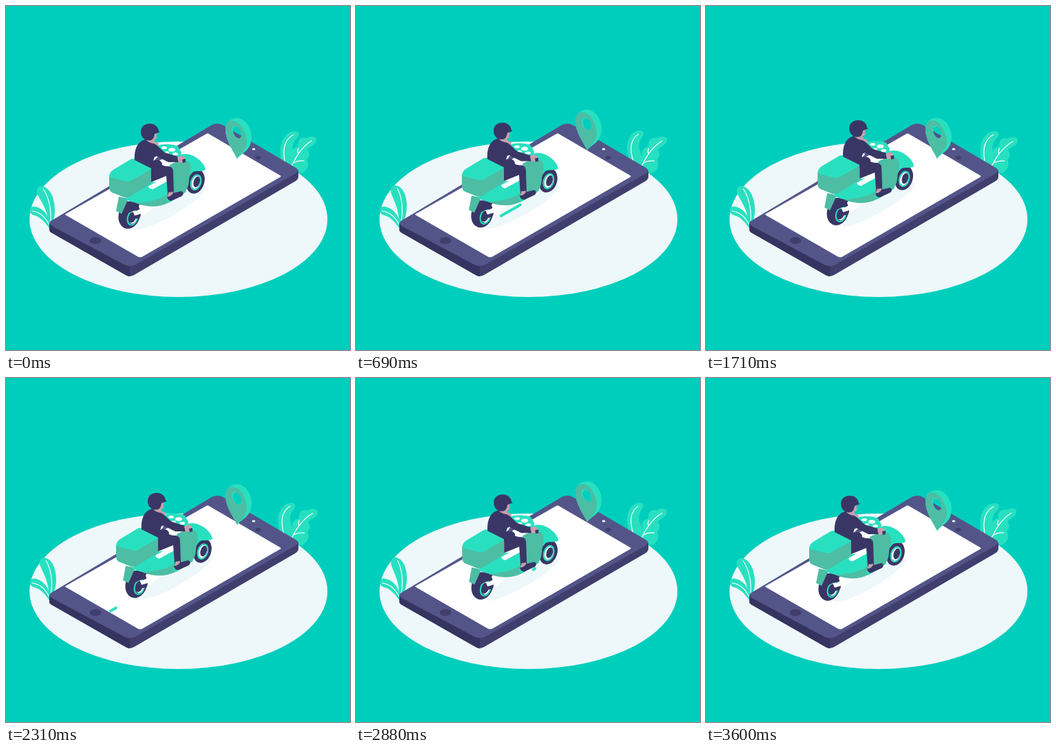
An HTML page that plays this animation: 500x500 px, repeating every 3660 ms.

```html
<!DOCTYPE html>
<html lang="en">
<head>
<meta charset="utf-8">
<title>Scooter delivery</title>
<style>
  html, body { margin: 0; height: 100%; overflow: hidden; background: #00cebd; }
  svg { display: block; width: 100vw; height: 100vh; }
  .bright { fill: #28e0c0; }
  .mid { fill: #4dbda4; }
  .navy { fill: #393665; }
  .side { fill: #403e6d; }
  .end { fill: #353460; }
  .top { fill: #535589; }
  .skin { fill: #c99fac; }
  .pale { fill: #eef7f9; }
  .white { fill: #fff; }
  .vein { fill: none; stroke: #fff; stroke-width: 1.2; stroke-linecap: round; }
  .rim { fill: none; stroke: #28e0c0; stroke-width: 2; }
</style>
</head>
<body>
<svg viewBox="0 0 500 500">
  <ellipse class="pale" cx="250.700" cy="310" rx="216.500" ry="113"/>

  <g id="leftLeaf">
    <path class="bright" d="M62 319C62 300 53 287 47 276C42 267 46 261 53 262C64 264 71 280 71 296C71 307 69 312 65 319Z"/>
    <path class="vein" d="M65 312C66 295 62 277 54 266"/>
  </g>
  <path class="bright" d="M63 323C57 315 50 306 40 304C34 302 33 295 37 292C46 289 60 299 63 312Z"/>
  <path class="vein" d="M62 317C57 306 48 299 38 298"/>

  <g id="rightLeaf">
    <path class="bright" d="M405 240C399 228 398 216 399 205C401 190 411 181 421 182C427 183 427 188 423 192C416 199 415 207 418 216L420 240Z"/>
    <path class="vein" d="M405 225C402 207 406 193 418 187"/>
  </g>
  <g id="wavyLeaf">
    <path class="bright" d="M411 240C411 231 415 224 416 217C414 209 419 205 425 204C423 195 429 190 437 192C445 187 453 190 451 196C449 203 441 204 438 209C443 215 440 220 437 223C442 230 438 239 430 243Z"/>
    <path class="vein" d="M414 235C420 222 428 206 444 196M418 228Q425 224 433 225M425 215Q423 210 425 207"/>
  </g>

  <path class="side" d="M63 316V325Q63 328 67 330L174 391Q180 394.500 186 391L420 255Q425 252 425 248V239Z"/>
  <path class="end" d="M63 316V325Q63 328 67 330L174 391Q177 393 180 393V378Z"/>
  <path class="top" d="M66 312L299 173Q308 169 316 173.500L421 235Q428 239 421 243.500L188 376Q180 380 172 376L67 320Q60 316 66 312Z"/>
  <path class="white" d="M87 302L291 186Q293 184.500 295 186L398 246Q401 247.500 398 249L198 364.500Q195 366 192 364.500L87 304Q85 303 87 302Z"/>
  <ellipse class="side" cx="130" cy="341" rx="8.500" ry="5"/>
  <ellipse class="white" cx="360" cy="208" rx="2.300" ry="1.500"/>
  <ellipse class="side" cx="366.500" cy="220.500" rx="4" ry="2.400"/>

  <g id="pin" fill-rule="evenodd">
    <path class="bright" d="M319 180C318 168 328 162 338 163C349 165 357 178 357 191C356 211 344 212 336 222C330 210 319 195 319 180ZM332 175.500A6.500 10 -28 0 0 341.500 193A6.500 10 -28 0 0 332 175.500Z"/>
    <path class="mid" d="M319 180C318 171 324 165 332 167C342 170 348 182 350 196C350 210 341 213 336 222C330 210 319 195 319 180ZM330.500 174.500A6.500 10 -28 0 0 340 192A6.500 10 -28 0 0 330.500 174.500Z"/>
  </g>

  <ellipse id="shadow" class="pale" cx="238" cy="293" rx="61" ry="12"/>
  <path id="dash" fill="none" stroke="#28e0c0" stroke-width="4" stroke-linecap="round"/>

  <g id="scooter">
    <g transform="rotate(17 275 256)">
      <ellipse class="navy" cx="275" cy="255" rx="13" ry="18"/>
      <ellipse class="white" cx="276" cy="256" rx="6" ry="10"/>
      <ellipse class="navy" cx="277" cy="255" rx="4.500" ry="8"/>
      <ellipse class="rim" cx="276" cy="256" rx="7" ry="11"/>
    </g>
    <g transform="rotate(17 179 305)">
      <ellipse class="navy" cx="179" cy="304" rx="15.500" ry="20"/>
      <ellipse class="white" cx="185" cy="305" rx="6.500" ry="10"/>
      <ellipse class="navy" cx="183.500" cy="306" rx="5.500" ry="8"/>
      <ellipse class="rim" cx="184.500" cy="306" rx="7" ry="11"/>
    </g>
    <path class="white" d="M185 300L197 294L200 301L196 307L188 307Z"/>
    <path class="navy" d="M174 284L197 284L190 296L175 302Z"/>
    <path class="navy" d="M186 305L196 302Q196 306 194 308L186 310Z"/>
    <path class="mid" d="M164 277L178 280L168 302L160 298Z"/>

    <path class="mid" d="M178 281L262 256L259 272L236 286C222 293 206 293 190 287Z"/>
    <path class="bright" d="M173 280L211 256L237 254V270C231 280 212 284 192 286Q182 286 173 280Z"/>
    <path class="bright" d="M232 281L260 266L262 270L237 286Z"/>
    <path class="white" d="M207 262L232 248L234 255L213 266.500Q208 266 207 262Z"/>

    <path class="bright" d="M216 205C222 200 243 200 250 204L255 213L253 222L229 218Z"/>
    <g class="white">
      <ellipse cx="230" cy="206" rx="4" ry="2"/>
      <ellipse cx="241" cy="209" rx="5" ry="2.800"/>
      <ellipse cx="234" cy="213" rx="3" ry="1.700"/>
      <ellipse cx="246" cy="215" rx="4" ry="2"/>
    </g>
    <path class="bright" d="M254 216C270 211 289 227 290 238C283 242 276 238 271 242C266 247 265 252 263 257L252 230Z"/>
    <path class="mid" d="M238 231C248 225 261 222 267 228C271 236 266 246 266 254Q265 268 258 271L240 274Z"/>

    <path class="bright" d="M150 247Q151 241 156 238L181 223Q185 221 189 223L209 233Q213 235 211 239L184 256H157Z"/>
    <path class="mid" d="M150 246Q151 249 156 250L176 255Q180 255 183 253L211 237V258L180 277Q175 280 169 277L154 271Q150 269 150 263Z"/>

    <path class="navy" d="M211 232L222 227Q226 233 237 233Q243 234 243 241L244 272L235 274L233 247L211 256Z"/>
    <path class="skin" d="M236 271L243 270L242 277L236 278Z"/>
    <path class="navy" d="M234 277Q239 278 243 272L255 269Q260 271 256 276L241 283Q235 284 234 277Z"/>

    <path class="skin" d="M202 192L213 190L217 198L222 199L221 205L207 202Z"/>
    <path class="navy" d="M187 224C186 207 192 196 203 194Q207 199 215 200C222 203 225 209 231 213L250 219L251 227L236 227L218 218L215 225Q224 222 227 229L226 237L211 240V236Z"/>
    <path class="white" d="M216 219L219 220L217 223L214 225Z"/>
    <path class="skin" d="M249 220Q255 215 260 220V226L251 228Z"/>
    <path class="navy" d="M256 223L261 222L261 227L257 228Z"/>

    <path class="skin" d="M209 183H219L219 192Q216 196 210 195Z"/>
    <path class="navy" d="M196 183C196 175 202 171 209 171C216 171 221 175 222 182L224 183L216 186Q215 193 211 195C202 197 196 191 196 183Z"/>
  </g>
</svg>
<script>
const LOOP = 3660, MOTION = 3600;
const DASH_START = 585, DASH_PERIOD = 1140, DASH_LIFE = 640;
const $ = id => document.getElementById(id);
const place = (id, transform) => $(id).setAttribute('transform', transform);

// Smooth swing 0 -> 1 -> 0 over one period.
const swing = (t, period) => (1 - Math.cos(2 * Math.PI * t / period)) / 2;

const onRoad = x => `${x} ${305 - (x - 211) * 0.57}`;

function drawDash(t) {
  const age = (t - DASH_START) % DASH_PERIOD;
  const visible = t >= DASH_START && age < DASH_LIFE;
  $('dash').style.display = visible ? '' : 'none';
  if (!visible) return;
  const front = Math.max(152, 266 - 0.52 * age);
  const tail = 266 - 114 * (age / DASH_LIFE) ** 0.8;
  $('dash').setAttribute('d', `M${onRoad(front)}L${onRoad(tail)}`);
}

function draw(now) {
  const t = Math.min(now % LOOP, MOTION);
  const ride = swing(t, 3600), bob = swing(t, 1800);
  const drive = `translate(${12.3 * ride} ${-5 * ride})`;
  place('scooter', drive);
  place('shadow', `${drive} rotate(-30 238 293)`);
  place('pin', `translate(0 ${-14 * bob})`);
  place('leftLeaf', `rotate(${7.5 * bob} 63 319)`);
  place('rightLeaf', `rotate(${-10 * bob} 410 238)`);
  place('wavyLeaf', `rotate(${2.5 * ride} 424 240)`);
  drawDash(t);
}

const start = performance.now();
function tick() {
  draw(performance.now() - start);
  requestAnimationFrame(tick);
}
tick();
</script>
</body>
</html>
```
